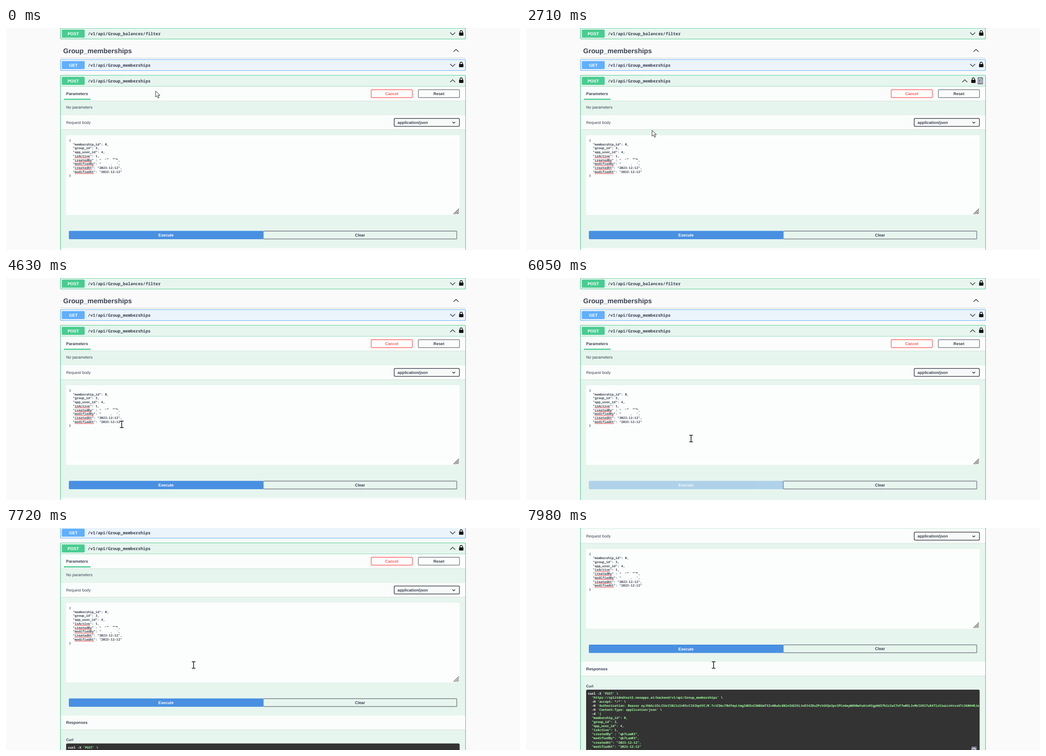
Recreate the animation shown at these times as an HTML page. Size 1137 by 493 pixels, loop 8000 ms.

```html
<!DOCTYPE html>
<html lang="en">
<head>
<meta charset="utf-8">
<title>API console</title>
<style>
  html, body { margin: 0; width: 100%; height: 100%; overflow: hidden; background: #fafafa; }
  svg { display: block; width: 1137px; height: 493px; }
  text { white-space: pre; fill: #3b4151; text-rendering: geometricPrecision; }
  .sans { font-family: "Liberation Sans", Arial, sans-serif; }
  .mono { font-family: "Noto Sans Mono", "DejaVu Sans Mono", monospace; }
  .bold { font-weight: 700; }
  .mid { text-anchor: middle; }
  .line { fill: none; stroke: #23262e; stroke-width: 1.3; }
</style>
</head>
<body>
<svg id="stage" viewBox="0 0 1137 493">
  <defs>
    <clipPath id="codeClip"><rect x="133" y="550" width="870.5" height="300"/></clipPath>
    <g id="lock">
      <rect x="-4.8" y="-1.6" width="9.6" height="7.2" rx="1" fill="#111"/>
      <path d="M-2.7-1V-3a2.7 2.7 0 0 1 5.4 0v2" fill="none" stroke="#111" stroke-width="1.5"/>
    </g>
    <path id="down" class="line" d="M-5.5-2.7L0 2.7L5.5-2.7"/>
    <path id="up" class="line" d="M-5.5 2.7L0-2.7L5.5 2.7"/>
    <g id="copy">
      <rect x="-6" y="-8" width="12" height="16" rx="2" fill="#7d8293"/>
      <path d="M3.5-1V-3.5h-7.5v7.5h3M-2-3.5v-1.5h3.5v1.5M0-.5h4v5h-4zM1 2h2" fill="none" stroke="#e8eaee"/>
    </g>
  </defs>
  <g id="page"></g>
  <g id="cursor">
    <path id="arrow" d="M0 0V13.2L3.1 10.4L5.4 15.6L7.7 14.6L5.4 9.6H9.6Z" fill="#fff" stroke="#222" stroke-width="1"/>
    <path id="hand" d="M-1.6 1.6a1.6 1.6 0 0 1 3.2 0V7.2q2.2-1.2 2.9.5q2-.8 2.6.8q2.2-.4 2.2 1.7V14q0 2.6-1.8 5.2H-.8Q-2-2.4+18-5.4 13q-.8-1.8.8-2.2q1.4-.2 3 2Z" fill="#fff" stroke="#222" stroke-width="1"/>
    <path id="beam" d="M-4-7.3h3q1 0 1 1q0-1 1-1h3M-4 7.3h3q1 0 1-1q0 1 1 1h3M0-6.5v13" fill="none" stroke="#111" stroke-width="1.5"/>
  </g>
</svg>
<script>
const LOOP = 8000;
const GREEN = '#49cc90', BLUE = '#61affe', LIME = '#a2fca2';
const byId = id => document.getElementById(id);
byId('hand').setAttribute('d',
  'M-1.6 12V1.8a1.6 1.6 0 0 1 3.2 0V7.4q2-1 2.8.5q1.9-.8 2.6.8q2.4-.4 2.4 1.7V14q0 2.600-1.800 5.200H-.6Q-2 16.500-5.300 13.400q-1-1.800.6-2.400q1.400-.2 3.100 1.800Z');

const rect = (x, y, w, h, fill, extra = '') =>
  `<rect x="${x}" y="${y}" width="${w}" height="${h}" fill="${fill}" ${extra}/>`;
// Text is placed by its left edge (or middle) and its optical centre line.
const text = (x, cy, size, str, cls = 'sans bold', extra = '') =>
  `<text x="${x}" y="${cy + size * 0.36}" font-size="${size}" class="${cls}" ${extra}>${str}</text>`;
const use = (id, x, y) => `<use href="#${id}" x="${x}" y="${y}"/>`;
const button = (x, y, w, h, label, color, ink) =>
  rect(x, y, w, h, 'none', `stroke="${color}" stroke-width="1.4" rx="1.5"`) +
  text(x + w / 2, y + h / 2, 8.9, label, 'sans bold mid', `style="fill:${ink}"`);
const strip = (y, h) =>
  rect(121, y, 895, h, '#fbfdfc') + rect(121, y + h, 895, 1, 'rgba(0,0,0,.08)');

function operation(y, h, verb, path, color, tint, controls) {
  return rect(120.5, y, 896, h, tint, `stroke="${color}" stroke-width="1.2" rx="2.5"`) +
    rect(123.5, y + 3.4, 50.5, 17.8, color, 'rx="2"') +
    text(148.8, y + 12.2, 9.3, verb, 'sans bold mid', 'style="fill:#fff"') +
    text(181, y + 12.6, 9.26, path, 'mono bold') + controls;
}

function squiggle(x, y, chars) {
  let d = `M${x} ${y}`;
  for (let i = 0; i < chars * 2; i++) d += `l2.1 ${i % 2 ? -1.2 : 1.2}`;
  return `<path d="${d}" fill="none" stroke="#e33" stroke-width="1"/>`;
}

function requestBody() {
  const lines = ['{', '  "membership_id": 0,', '  "group_id": 3,', '  "app_user_id": 4,',
    '  "isActive": 1,', '  "createdBy" : "        ",', '  "modifiedBy": "        \',',
    '  "createdAt": "2023-12-12",', '  "modifiedAt": "2023-12-12"', '}'];
  const dashes = '<path d="M219 291.500h2M223 290.500h4M236 290.500h5M242 290.500h4M233 303.500l-1 1.500" stroke="#3b4151" fill="none"/>';
  return lines.map((line, i) => {
    const y = 249.4 + i * 8.73;
    const word = i > 3 && line.match(/\w+/);
    return text(139.5, y, 6.98, line, 'mono bold') +
      (word ? squiggle(152, y + 3.5, word[0].length) : '');
  }).join('') + dashes;
}

function fakeToken() {
  const chars = 'ABCDEFGHIJKLMNOPQRSTUVWXYZabcdefghijklmnopqrstuvwxyz0123456789';
  let seed = 41, out = '';
  while (out.length < 150) {
    seed = (seed * 16807) % 2147483647;
    out += chars[seed % chars.length];
  }
  return 'eyJhbGciOiJIUzI1NiIsInR5cCI6IkpXVCJ9.' + out;
}

function curlBlock() {
  const lines = ["curl -X |'POST'| \\",
    "  |'https://splitdndtest2.neoapps.ai/backend/v1/api/Group_memberships'| \\",
    "  -H |'accept: */*'| \\",
    `  -H |'Authorization: Bearer ${fakeToken()}`,
    "  -H |'Content-Type: application/json'| \\",
    "  -d |'{", '|  "membership_id": 0,', '|  "group_id": 3,', '|  "app_user_id": 4,',
    '|  "isActive": 1,', '|  "createdBy" : "qk7LumR3",', '|  "modifiedBy": "qk7LumR3",',
    '|  "createdAt": "2023-12-12",', '|  "modifiedAt": "2023-12-12"', "|}'"];
  const paint = line => line.split('|').map((part, i) =>
    `<tspan style="fill:${i % 2 ? LIME : '#fff'}">${part}</tspan>`).join('');
  return text(133, 542.5, 8, 'Curl') + rect(133, 550.5, 870.5, 145, '#333', 'rx="3"') +
    '<g clip-path="url(#codeClip)">' +
    lines.map((line, i) => text(137, 559 + i * 9.04, 7, paint(line), 'mono bold')).join('') +
    '</g>' + use('copy', 991, 685);
}

byId('page').innerHTML =
  operation(0.2, 24.3, 'POST', '/v1/api/Group_balances/filter', GREEN, '#e8f5ef',
    use('down', 988, 12.7) + use('lock', 1007, 11.5)) +
  text(126.500, 50.2, 15.12, 'Group_memberships') + use('up', 995.5, 50) +
  rect(120, 66, 897, 1, '#d0d2d5') +
  operation(70, 24.5, 'GET', '/v1/api/Group_memberships', BLUE, '#ebf3fb',
    use('down', 988, 82.700) + use('lock', 1007, 81.5)) +
  operation(105, 800, 'POST', '/v1/api/Group_memberships', GREEN, '#e6f5ee',
    `<g id="controls">${use('up', 988, 117.5)}${use('lock', 1007, 116.5)}</g>` +
    `<g id="copyIcon">${use('copy', 1005, 117.2)}</g>`) +
  rect(121, 129, 895, 1, '#8fdcb9') +
  strip(130, 31.5) + text(133, 146, 8.9, 'Parameters') + rect(128, 157, 59, 2.6, GREEN) +
  button(807.8, 137, 91, 17.500, 'Cancel', '#ff6060', '#ff6060') +
  button(912.2, 137, 91, 17.5, 'Reset', '#777b82', '#3b4151') +
  text(133, 176, 8.82, 'No parameters', 'sans') +
  strip(194, 31) + text(133, 209.8, 8.82, 'Request body', 'sans') +
  rect(858.700, 200.7, 144.300, 17.800, '#f8faf9', 'stroke="#41444e" stroke-width="1.5" rx="2.5"') +
  text(866, 209.6, 8.82, 'application/json') +
  '<path class="line" d="M987.500 208.500l3 3l3-3"/>' +
  rect(133, 238, 870.5, 177, '#fcfefd', 'rx="2"') + requestBody() +
  '<path d="M990 413.500l12-12M994 413.500l8-8M998 413.500l4-4" stroke="#444" stroke-width="1.1"/>' +
  button(569, 451, 428.3, 17.500, 'Clear', '#777b82', '#3b4151') +
  `<g id="execute">${rect(139, 450.4, 430, 18.600, '#4990e2', 'rx="2"')}` +
  text(354, 459.8, 8.9, 'Execute', 'sans bold mid', 'style="fill:#fff"') + '</g>' +
  `<g id="responses">${strip(488.5, 31)}${text(133, 504, 8.9, 'Responses')}</g>` +
  `<g id="result">${curlBlock()}</g>`;

// Linear interpolation through [time, ...values] keys.
function track(keys, t) {
  if (t <= keys[0][0]) return keys[0].slice(1);
  for (let i = 1; i < keys.length; i++) {
    const a = keys[i - 1], b = keys[i];
    if (t <= b[0]) {
      const k = (t - a[0]) / (b[0] - a[0]);
      return a.slice(1).map((v, j) => v + (b[j + 1] - v) * k);
    }
  }
  return keys[keys.length - 1].slice(1);
}

const arrival = [[190, 331, 140], [260, 302, 111]];
const travel = [[2600, 302, 111], [2710, 279, 227], [3100, 232, 262], [3460, 214, 272],
  [3600, 209, 263], [3900, 235, 300], [4230, 253, 322], [4430, 256, 325], [4660, 256, 325],
  [5050, 299, 466], [5200, 299, 466], [5250, 299.500, 465.5], [5450, 299.5, 465.5],
  [5600, 310, 435], [6050, 365, 356.7], [6250, 397, 331], [6520, 415, 306.2],
  [7450, 415, 306.2], [7520, 415, 304.2]];
const scroll = [[7030, 0], [7120, 27.5], [7190, 46], [7260, 57], [7330, 62], [7400, 63],
  [7680, 63], [7720, 71.5], [7790, 105], [7860, 148], [7930, 180], [7980, 191.5]];
const hover = [[330, 0], [600, 1], [2720, 1], [3000, 0]];
const fade = [[5450, 1], [5750, 0.35], [7030, 0.35], [7120, 0.77], [7220, 1]];

function cursorAt(t) {
  if (t < 260) return track(arrival, t);
  if (t > 2600) return track(travel, t);
  const angle = 0.8 - (t - 260) / 2340 * 6 * Math.PI;
  return [232 + 100 * Math.cos(angle), 82 + 40 * Math.sin(angle)];
}

function cursorKind(y) {
  if (y < 130 || y > 450) return 'hand';
  return y > 237 && y < 440 ? 'beam' : 'arrow';
}

function draw(now) {
  const t = now % LOOP;
  const [x, y] = cursorAt(t), kind = cursorKind(y), open = track(hover, t)[0];
  byId('cursor').setAttribute('transform', `translate(${x} ${y})`);
  for (const id of ['arrow', 'hand', 'beam']) byId(id).style.display = id === kind ? '' : 'none';
  byId('page').setAttribute('transform', `translate(0 ${-track(scroll, t)[0]})`);
  byId('controls').setAttribute('transform', `translate(${-17.3 * open} 0)`);
  byId('copyIcon').style.opacity = open;
  byId('execute').style.opacity = track(fade, t)[0];
  byId('responses').style.display = t > 5510 && t < 7050 ? 'none' : '';
  byId('result').style.display = t < 7050 ? 'none' : '';
  requestAnimationFrame(later => draw(later - start));
}

const start = performance.now();
draw(0);
</script>
</body>
</html>
```
